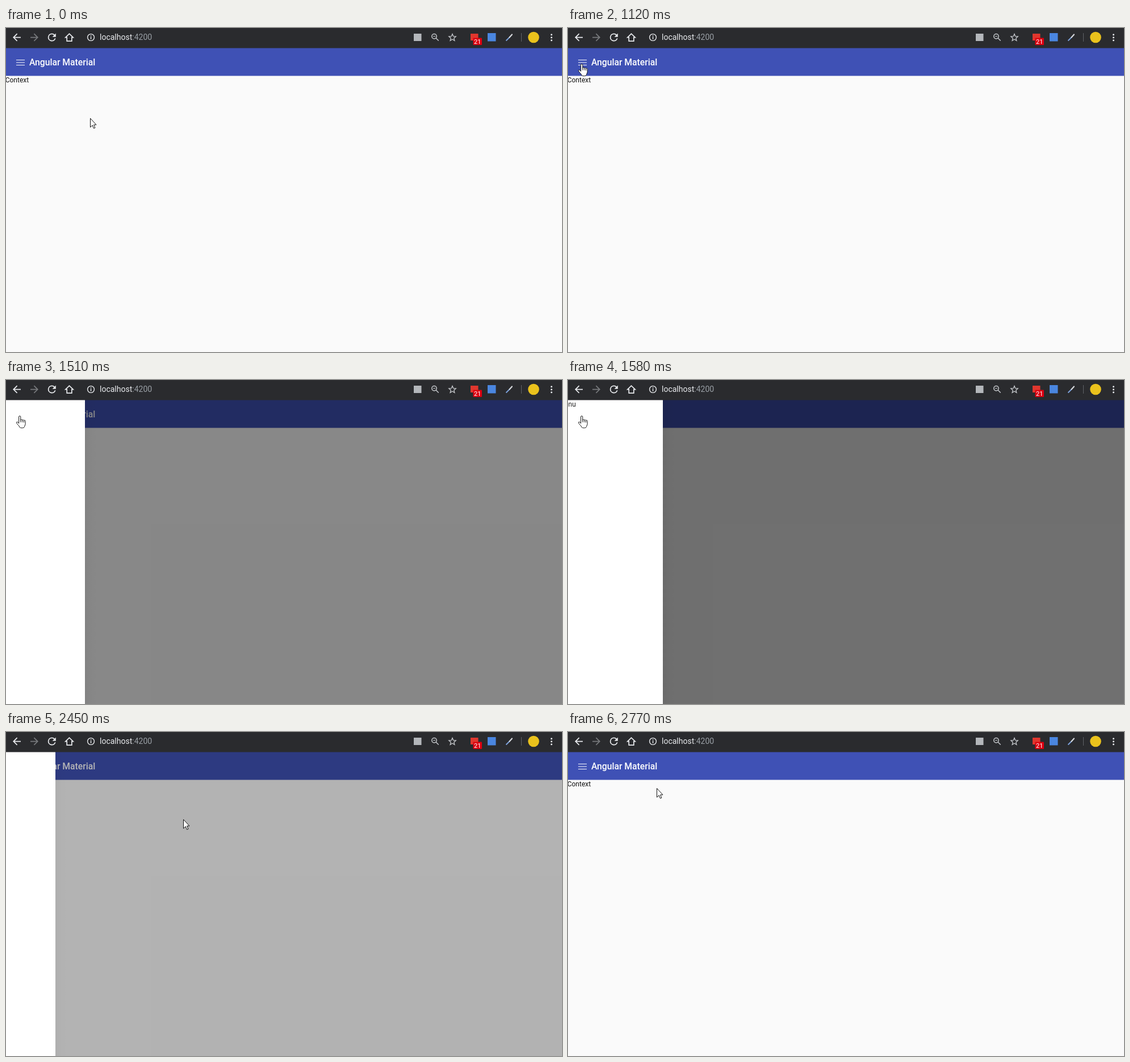
An HTML page for the animation above (2840 ms loop, 979 px wide and 572 px high).

```html
<!DOCTYPE html>
<html lang="en">
<head>
<meta charset="utf-8">
<title>Side menu</title>
<style>
html, body { margin: 0; width: 100%; height: 100%; overflow: hidden; background: #fafafa; }
svg { display: block; width: 979px; height: 572px; }
text { font-family: Roboto, "Open Sans", sans-serif; }
</style>
</head>
<body>
<svg viewBox="0 0 979 572" xmlns="http://www.w3.org/2000/svg">
  <defs>
    <linearGradient id="fade">
      <stop offset="0" stop-opacity=".19"/>
      <stop offset=".17" stop-opacity=".11"/>
      <stop offset=".33" stop-opacity=".06"/>
      <stop offset=".67" stop-opacity=".012"/>
      <stop offset="1" stop-opacity="0"/>
    </linearGradient>
    <path id="back" d="M20 11H7.83l5.59-5.59L12 4l-8 8 8 8 1.41-1.41L7.83 13H20z"/>
  </defs>

  <!-- page -->
  <rect width="979" height="572" fill="#fafafa"/>
  <rect y="30" width="979" height="54.5" fill="#3f51b5"/>
  <circle id="ripple" cx="24.3" cy="62.3" r="14" fill="#fff" fill-opacity=".14"/>
  <path d="M18 56.5h15M18 61h15M18 65.5h15" stroke="#fff" stroke-width="1.1"/>
  <text x="41" y="65.5" font-size="15.7" font-weight="500" fill="#fff">Angular Material</text>
  <text x="-1.3" y="96" font-size="12" fill="#111">Context</text>

  <!-- drawer -->
  <rect id="shade" y="30" width="979" height="542"/>
  <g id="drawer">
    <rect id="shadow" x="182" y="30" width="30" height="542" fill="url(#fade)"/>
    <rect y="30" width="182" height="542" fill="#fff"/>
    <text x="-1.3" y="47" font-size="12" fill="#222">Menu</text>
  </g>

  <!-- browser bar -->
  <rect width="979" height="35.5" fill="#2a2b2e"/>
  <g fill="#e8eaed">
    <use href="#back" transform="translate(8.5 6) scale(.875)"/>
    <use href="#back" transform="translate(60.5 6) scale(-.875 .875)" fill="#77797c"/>
    <path transform="translate(70.3 6) scale(.875)" d="M17.65 6.35A7.96 7.96 0 0 0 12 4a8 8 0 1 0 7.73 10h-2.08A6 6 0 1 1 12 6c1.66 0 3.14.69 4.22 1.78L13 11h7V4z"/>
    <path d="M111.5 10.2L104.8 16.7H107.2V23.2H115.8V16.7H118.2Z" fill="none" stroke="#e8eaed" stroke-width="1.7"/>
    <circle cx="149.5" cy="16.5" r="5.9" fill="none" stroke="#e8eaed" stroke-width="1.4"/>
    <path d="M148.8 15.5h1.5v4.2h-1.5zM148.8 12.9h1.5v1.5h-1.5z"/>
    <text x="165" y="21" font-size="14">localhost<tspan fill="#9aa0a6">:4200</tspan></text>
  </g>
  <rect x="718" y="10" width="13.5" height="13" fill="#b4b7bb"/>
  <g fill="none" stroke="#c6c9cd" stroke-width="1.5">
    <circle cx="754" cy="14.7" r="4.2"/>
    <path d="M757 17.8l4.7 4.7"/>
    <path d="M752 14.7h4" stroke-width="1.1"/>
    <path id="star" stroke-width="1.3"/>
  </g>
  <rect x="818" y="10" width="13.5" height="12" fill="#e0372e"/>
  <rect x="822.5" y="17.5" width="15.5" height="12.5" rx="1" fill="#dc0010"/>
  <text x="830.2" y="28" font-size="11" text-anchor="middle" fill="#fff">21</text>
  <rect x="848" y="9" width="14.5" height="14.5" fill="#4a86e0"/>
  <path d="M880.5 22.5l6.5-6.5" stroke="#7ea2dc" stroke-width="2"/>
  <path d="M886.5 16.5l4.5-5" stroke="#d5d8dc" stroke-width="2.2" stroke-linecap="round"/>
  <path d="M907.5 9v15" stroke="#5f6368"/>
  <circle cx="929" cy="16.5" r="9.8" fill="#eac21c"/>
  <g fill="#e8eaed">
    <circle cx="960.5" cy="11.7" r="1.5"/>
    <circle cx="960.5" cy="16.7" r="1.5"/>
    <circle cx="960.5" cy="21.7" r="1.5"/>
  </g>

  <!-- pointers, tip at 0,0 -->
  <g fill="#fff" stroke="#111" stroke-width="1" stroke-linejoin="round">
    <path id="arrow" d="M.5.5V16.2L4.2 12.8 6.5 18.2 8.9 17.2 6.6 11.9H11Z"/>
    <g id="hand">
      <path d="M-1.4 13.5V2.1a1.6 1.6 0 0 1 3.2 0V7.7a1.5 1.5 0 0 1 2.9.4a1.5 1.5 0 0 1 2.8.6a1.4 1.4 0 0 1 2.6.9V14.500c0 2-1.3 3-1.6 5-.4 2.8-8 2.8-8.600.5C-1 17.500-4 15.500-5.400 12.800c-.7-1.700 1.200-2.500 2.400-1.200z"/>
      <path d="M1.8 7.5v4M4.7 8.2v3.5M7.5 9v3" fill="none"/>
    </g>
  </g>
</svg>
<script>
const LOOP = 2840;
const TICKS = [0, 130, 200, 280, 350, 420, 500, 570, 880, 960, 1040, 1120, 1290,
  1430, 1510, 1580, 1660, 1740, 1810, 1890, 1970, 2290, 2370, 2450, 2530, 2610, 2690, 2770];
const WIDTH = 182;
const $ = id => document.getElementById(id);
const span = (t, a, b) => Math.min(1, Math.max(0, (t - a) / (b - a)));
const smooth = u => u * u * (3 - 2 * u);
const linear = u => u;
const easeOut = u => 1 - Math.pow(1 - u, 1.65);

// cubic-bezier(.25, .8, .25, 1)
function drawerEase(x) {
  const curve = (p, q, s) => 3 * (1 - s) * (1 - s) * s * p + 3 * (1 - s) * s * s * q + s * s * s;
  let lo = 0, hi = 1;
  for (let i = 0; i < 24; i++) {
    const mid = (lo + hi) / 2;
    if (curve(.25, .25, mid) < x) lo = mid; else hi = mid;
  }
  return curve(.8, 1, lo);
}

const moves = [
  { from: 60, to: 570, end: [17, 44], ease: smooth },
  { from: 800, to: 1120, end: [24, 63], ease: linear },
  { from: 1660, to: 1970, end: [312, 154], ease: easeOut },
  { from: 2530, to: 2770, end: [156, 99], ease: linear }
];

function pointer(t) {
  let x = 148, y = 159;
  for (const m of moves) {
    const u = m.ease(span(t, m.from, m.to));
    x += (m.end[0] - x) * u;
    y += (m.end[1] - y) * u;
  }
  return [Math.round(x), Math.round(y)];
}

const show = (el, on) => el.setAttribute("visibility", on ? "visible" : "hidden");

function draw(now) {
  const ms = now % LOOP;
  const t = TICKS.filter(v => v <= ms).pop();
  const open = drawerEase(span(t, 1398.5, 1788.5)) * (1 - smooth(span(t, 2262, 2627)));
  const left = Math.round(WIDTH * (open - 1));

  $("shade").setAttribute("fill-opacity", .6 * open);
  $("drawer").setAttribute("transform", `translate(${left} 0)`);
  show($("drawer"), left > -WIDTH);
  $("shadow").setAttribute("opacity", open > .99 ? 1 : .3 * open);
  show($("ripple"), t >= 1290 && t < 2000);

  const [x, y] = pointer(t);
  const overButton = x < 40;
  show($("hand"), overButton);
  show($("arrow"), !overButton);
  $(overButton ? "hand" : "arrow").setAttribute("transform", `translate(${x} ${y})`);
}

let star = "";
for (let i = 0; i < 10; i++) {
  const a = i * Math.PI / 5, r = i % 2 ? 2.9 : 6.5;
  star += (i ? "L" : "M") + (786 + r * Math.sin(a)).toFixed(2) + " " + (17 - r * Math.cos(a)).toFixed(2);
}
$("star").setAttribute("d", star + "Z");

const start = performance.now();
function loop() {
  draw(performance.now() - start);
  requestAnimationFrame(loop);
}
loop();
</script>
</body>
</html>
```
